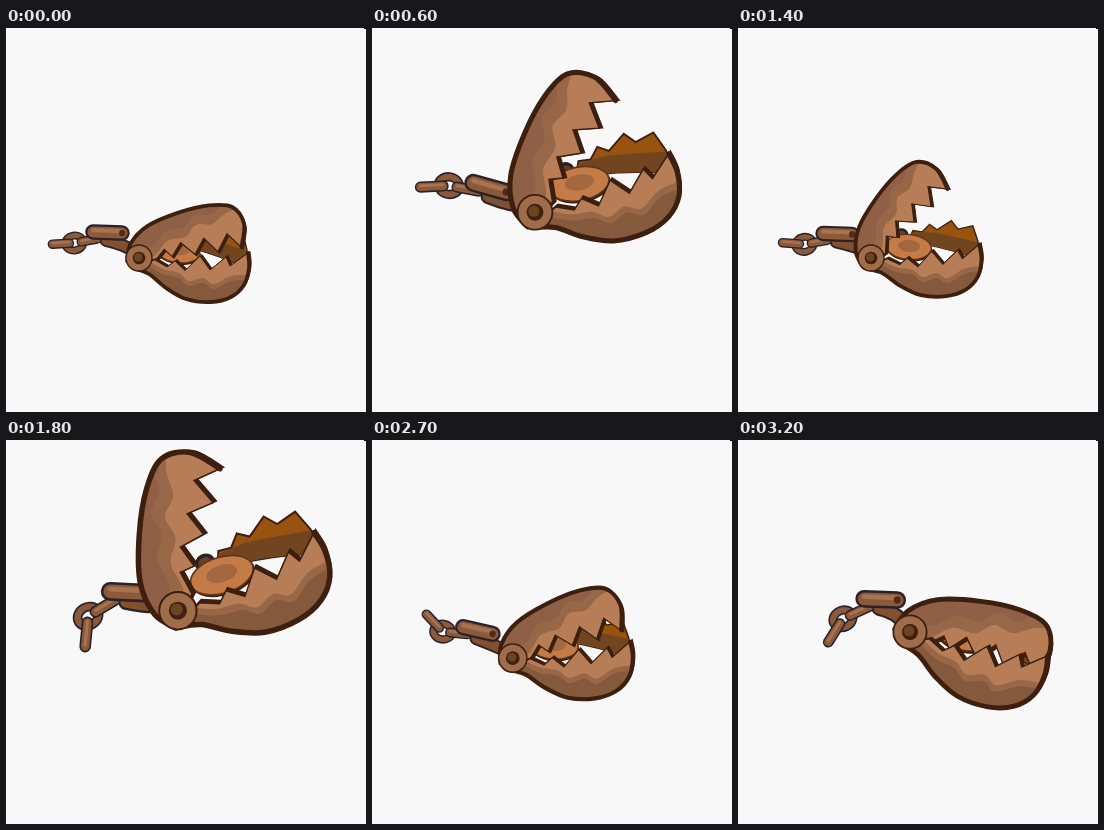
Animation, 360 px wide and 384 px high, one loop 3.3 s. Source, as an HTML page with a canvas:

```html
<!DOCTYPE html>
<html lang="en">
<head>
<meta charset="utf-8">
<title>Bear trap</title>
<style>
html, body { margin: 0; width: 100%; height: 100%; overflow: hidden; background: #f8f8f8; }
canvas { display: block; }
</style>
</head>
<body>
<canvas id="stage" width="360" height="384"></canvas>
<script>
const ctx = document.getElementById('stage').getContext('2d');
const LOOP = 3300, STEP = 100, CYCLE = 3400 / 3;
const INK = '#3c1f0f', CHAIN_INK = '#2a2129', IRON = '#8a5a3b';
const LIGHT = '#b67d57', MID = '#986748', DEEP = '#85593b';

const rad = deg => deg * Math.PI / 180;
const mix = (a, b, u) => a + (b - a) * u;
const ramp = (t, from, to) => Math.max(0, Math.min(1, (t - from) / (to - from)));
const bump = (t, from, to) => Math.sin(Math.PI * ramp(t, from, to));

// Chomp on the ground, leap with open jaws, lunge and snap shut, fall back
function pose(t) {
  const leap = ramp(t, 375, 675) * (1 - ramp(t, 700, 1080) ** 2);
  const chomp = Math.sin(Math.PI / 2 * ramp(t, 0, 95)) * (1 - ramp(t, 290, 430));
  const snap = ramp(t, 690, 780);
  const tug = bump(t, 380, 670);
  const whip = ramp(t, 600, 670) * leap;
  const low = mix(-28 * leap - 4.5 * chomp, 20 * leap, snap);
  return {
    x: 133 + 40 * leap + 30 * bump(t, 680, 980),
    y: 230 - 61 * leap,
    scale: 1 + 0.45 * leap,
    low,
    high: mix(-6 - 36 * chomp - 70 * leap ** 1.3, low - 6 + 16.5 * Math.sqrt(leap), snap),
    shackle: -2 - 20 * tug,
    middle: 10 - 30 * tug + 24 * whip,
    end: 3 - 50 * bump(t, 250, 600) + 88 * whip
  };
}

// Jaws lie along the x axis with the hinge at the origin
const upperTeeth = [];
for (let i = 0; i < 3; i++) {
  upperTeeth.push([90 - 23.5 * i, 2 * i - 15], [79 - 23 * i, 2]);
}
const upper = {
  rim: [[-12, 2], [-7, -15], [12, -31], [44, -41], [75, -45], [98, -41], [108, -23], [103, 0]],
  teeth: [...upperTeeth, [26, -6], [14, 6]],
  shade: [[-10, 4], [14, 0], [30, -14], [48, -16], [60, -27], [76, -26], [90, -35], [106, -40]],
  tones: [[0, MID], [-10, '#8f6045']],
  away: -60, shift: [1.8, 2]
};
const lower = {
  rim: [[-6, 10], [10, 16], [27, 30], [47, 41], [72, 44], [92, 39], [105, 27], [110, 10], [109, -5]],
  teeth: [[91, 8], [87, -1], [71, 12], [61, -2], [46, 12.5], [36, 3], [28, 9], [16, 2]],
  shade: [[6, 0], [24, 11], [40, 15], [50, 23], [64, 20], [75, 26], [92, 18], [110, 17]],
  tones: [[0, MID], [5, DEEP]],
  away: 60, shift: [2, -1.5]
};
const farTeeth = [[38, -14], [44, -24], [53, -22], [61, -29], [68, -23], [83, -31], [89, -22],
  [104, -24], [108, -8], [105, 9]];

// Smooth curve through every point
function curve(pts) {
  const at = i => pts[Math.max(0, Math.min(pts.length - 1, i))];
  for (let i = 0; i < pts.length - 1; i++) {
    const [p, a, b, n] = [at(i - 1), at(i), at(i + 1), at(i + 2)];
    ctx.bezierCurveTo(a[0] + (b[0] - p[0]) / 6, a[1] + (b[1] - p[1]) / 6,
      b[0] - (n[0] - a[0]) / 6, b[1] - (n[1] - a[1]) / 6, b[0], b[1]);
  }
}

function paint(fill, stroke, width) {
  if (fill) { ctx.fillStyle = fill; ctx.fill(); }
  if (stroke) { ctx.strokeStyle = stroke; ctx.lineWidth = width; ctx.stroke(); }
}

function oval(x, y, rx, ry, angle, fill, stroke, width) {
  ctx.beginPath();
  ctx.ellipse(x, y, rx, ry, angle, 0, Math.PI * 2);
  paint(fill, stroke, width);
}

function rimPath(jaw) {
  ctx.beginPath();
  ctx.moveTo(...jaw.rim[0]);
  curve(jaw.rim);
}

function jawPath(jaw) {
  rimPath(jaw);
  jaw.teeth.forEach(p => ctx.lineTo(...p));
  ctx.closePath();
}

function drawJaw(jaw, angle) {
  ctx.save();
  ctx.rotate(rad(angle));
  ctx.save();
  ctx.translate(...jaw.shift);
  jawPath(jaw);
  paint(INK, INK, 1);
  ctx.restore();

  jawPath(jaw);
  paint(LIGHT, INK, 1);
  ctx.save();
  ctx.clip();
  for (const [push, color] of jaw.tones) {
    const edge = jaw.shade.map(([x, y]) => [x, y + push]);
    ctx.beginPath();
    ctx.moveTo(...edge[0]);
    curve(edge);
    ctx.lineTo(125, jaw.away);
    ctx.lineTo(-30, jaw.away);
    paint(color);
  }
  ctx.restore();

  rimPath(jaw);
  paint(null, INK, 3.8);
  ctx.restore();
}

function drawInside(angle) {
  ctx.save();
  ctx.rotate(rad(angle));
  ctx.beginPath();
  ctx.moveTo(...farTeeth[0]);
  farTeeth.forEach(p => ctx.lineTo(...p));
  curve([[105, 9], [81, -1], [59, -8], [38, -11]]);
  ctx.closePath();
  paint('#98530f', INK, 1.4);
  ctx.save();
  ctx.clip();
  ctx.beginPath();
  ctx.moveTo(36, -22);
  curve([[36, -22], [60, -21], [80, -16], [112, -6]]);
  ctx.lineTo(112, 14);
  ctx.lineTo(36, 14);
  paint('#70451f');
  ctx.restore();
  oval(32, -21, 6, 5, 0, '#6b4029', CHAIN_INK, 2.5);
  oval(39, -6, 23, 12.5, rad(10), INK);
  oval(38.5, -8, 22.5, 12.5, rad(10), '#c57b48', '#643415', 1.2);
  oval(39, -9, 11, 6, rad(10), '#a3683f');
  ctx.restore();
}

function bar(a, b, width) {
  for (const [w, color, dy] of [[1, CHAIN_INK, 0], [0.72, IRON, 0], [0.26, '#a97350', -0.12]]) {
    ctx.beginPath();
    ctx.moveTo(a[0], a[1] + dy * width);
    ctx.lineTo(b[0], b[1] + dy * width);
    paint(null, color, w * width);
  }
}

// Point reached from p by going left, tilted downward by deg
const reach = (p, deg, length) =>
  [p[0] - Math.cos(rad(deg)) * length, p[1] + Math.sin(rad(deg)) * length];

function drawChain({ x, y, scale, low, shackle, middle, end }) {
  const k = (1 + scale) / 2;
  const c = Math.cos(rad(low)), s = Math.sin(rad(low));
  const pin = [x + k * (25 * s - 17 * c), y - k * (25 * c + 17 * s)];
  const back = reach(pin, shackle, 29 * k);
  const joint = [back[0] + 4 * k, back[1] + 7 * k];
  const far = reach(joint, middle, 16 * scale);
  const ring = reach(far, middle, 7 * k);
  const near = reach(ring, end, 5 * k);

  for (const [w, color] of [[13, CHAIN_INK], [9.5, '#80502f']]) {
    ctx.beginPath();
    ctx.moveTo(mix(back[0], pin[0], 0.45), mix(back[1], pin[1], 0.45) + 8 * k);
    ctx.quadraticCurveTo(mix(pin[0], x, 0.2), pin[1] + 12 * k, x - 6, y - 7);
    paint(null, color, w * k);
  }
  for (const [w, color] of [[8, CHAIN_INK], [5.2, IRON]]) {
    oval(...ring, 9 * k, 7.5 * k, rad(-middle), null, color, w * k);
  }
  bar(joint, far, 9.5 * k);
  bar(near, reach(near, end, 17 * scale), 9.5 * k);
  bar(back, pin, 15.5 * k);
  oval(...pin, 3 * k, 3.3 * k, 0, '#54291a');
}

function draw(time) {
  const p = pose(time % CYCLE);
  ctx.fillStyle = '#f8f8f8';
  ctx.fillRect(0, 0, 360, 384);
  ctx.fillStyle = '#000';
  ctx.fillRect(358, 0, 2, 1);
  ctx.lineCap = 'round';
  drawChain(p);

  ctx.save();
  ctx.translate(p.x, p.y);
  ctx.scale(p.scale, p.scale);
  drawInside(p.low);
  drawJaw(upper, p.high);
  drawJaw(lower, p.low);
  oval(0, 0, 13, 13, 0, '#a06d4a', INK, 1.4);
  oval(0, 0, 6.3, 6.3, 0, '#40200f');
  oval(-0.8, -0.8, 4.2, 4.2, 0, '#6b4420');
  ctx.restore();
}

function tick(now) {
  draw(Math.floor(now % LOOP / STEP) * STEP);
  requestAnimationFrame(tick);
}
draw(0);
requestAnimationFrame(tick);
</script>
</body>
</html>
```
